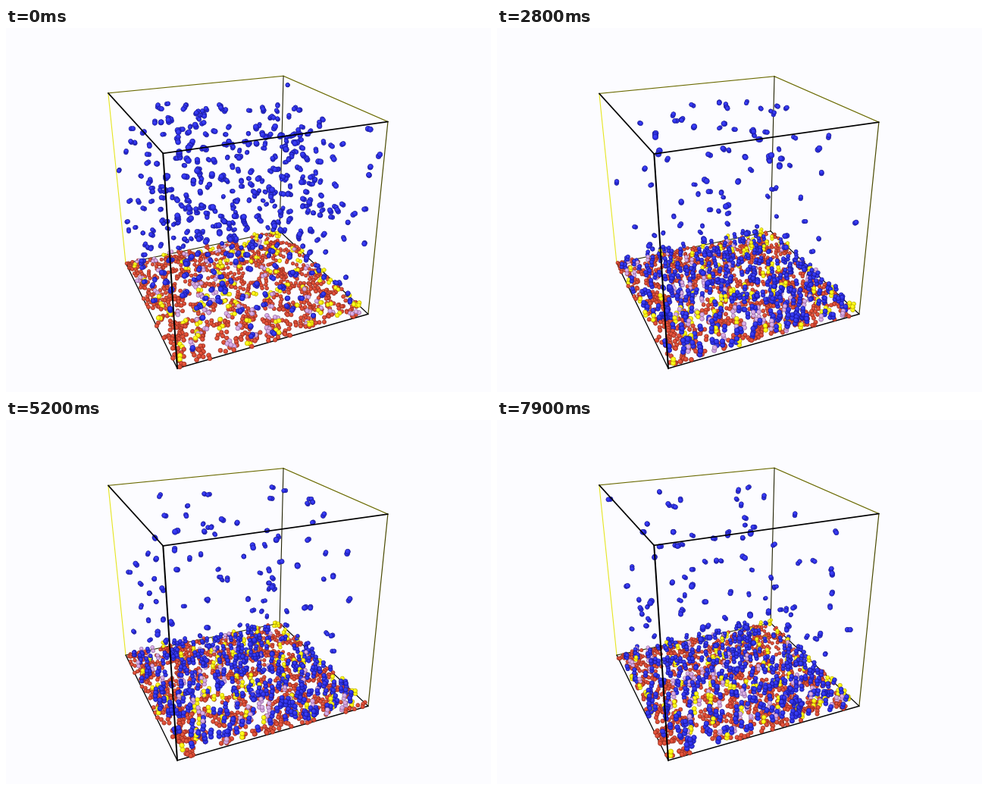
Animation, 640 px wide and 480 px high, one loop 8 s. Source, as a matplotlib script:

```python
import numpy as np
import matplotlib.pyplot as plt
from matplotlib.animation import FuncAnimation

W, H, DPI = 640, 480, 80
FRAMES, STEP = 80, 100
PT = 72 / DPI
N_RED, N_YELLOW, N_PLUM, N_GAS, N_LAND = 560, 88, 68, 106, 340

BLUE, RED, YELLOW, PLUM = range(4)
RADIUS = np.array([3.75, 3.3, 3.5, 3.5])
BODY = np.array([[40, 42, 222], [212, 68, 46], [248, 240, 0], [208, 158, 220]]) / 255
RIM = np.array([[24, 24, 140], [140, 42, 28], [176, 164, 0], [136, 98, 148]]) / 255
SHINE = np.array([[58, 62, 244], [228, 86, 62], [255, 252, 40], [220, 178, 232]]) / 255

# Corners of the box: floor then lid, starting at the front and going right.
CORNERS = [(0, 0), (1, 0), (1, 1), (0, 1)]
FLOOR = [(226, 449), (478, 377), (361, 268), (158, 310)]
LID = [(207, 165), (504, 124), (366, 63), (135, 86)]


def fit_camera():
    """Least-squares perspective matrix from the eight box corners."""
    rows, rhs = [], []
    for z, pixels in enumerate((FLOOR, LID)):
        for (x, y), (u, v) in zip(CORNERS, pixels):
            rows.append([x, y, z, 1, 0, 0, 0, 0, -u * x, -u * y, -u * z])
            rows.append([0, 0, 0, 0, x, y, z, 1, -v * x, -v * y, -v * z])
            rhs += [u, v]
    sol = np.linalg.lstsq(np.array(rows, float), np.array(rhs, float), rcond=None)[0]
    return np.append(sol, 1).reshape(3, 4)


CAMERA = fit_camera()


def project(p):
    q = np.c_[p, np.ones(len(p))] @ CAMERA.T
    return q[:, :2] / q[:, 2:], q[:, 2]


def box_height(k):
    return np.interp(k, [0, 10, 43, 56, 61, 65, 79],
                     [1, 1, 0.996, 0.999, 0.985, 0.998, 1])


def fold(a):
    """Reflect positions at the walls 0 and 1."""
    return 1 - np.abs(a % 2 - 1)


rng = np.random.default_rng(12)
turn = rng.uniform(0, 2 * np.pi, 7)
WAVES = np.c_[np.cos(turn), np.sin(turn)]
WAVE_NUM = rng.uniform(32, 60, 7)
WAVE_PHASE = rng.uniform(0, 6.3, 7)
WAVE_SPEED = rng.uniform(-0.3, 0.3, 7)


class Layer:
    """Sites on the floor that wander and gather into patches."""

    def __init__(self, n):
        self.base = rng.random((n, 2))
        self.phase = rng.uniform(0, 6.3, (n, 2))
        self.speed = rng.normal(0, 0.3, (n, 2))
        self.angle = rng.uniform(0, 6.3, n)
        self.spin = rng.normal(0, 0.4, n)

    def at(self, k, noise):
        p = self.base + 0.04 * np.sin(self.phase + self.speed * k)
        arg = p @ WAVES.T * WAVE_NUM + WAVE_PHASE + WAVE_SPEED * k
        p = p + 0.005 * np.sin(arg) @ WAVES
        p += noise.normal(0, 0.005, p.shape)
        return 0.005 + 0.99 * fold(p)

    def axis(self, k):
        a = self.angle + self.spin * k
        return np.c_[np.cos(a), np.sin(a)]


def unit(n):
    v = rng.normal(size=(n, 3))
    return v / np.linalg.norm(v, axis=1)[:, None]


red, yellow, plum, landed = (Layer(n) for n in (N_RED, N_YELLOW, N_PLUM, N_LAND))
gas_pos = rng.random((N_GAS, 3))
gas_vel = rng.normal(0, 0.11, (N_GAS, 3))
gas_axis, gas_side = unit(N_GAS), unit(N_GAS)
gas_spin = rng.normal(0, 0.8, N_GAS)
fall_pos = rng.random((N_LAND, 3)) * [1, 1, 0.96] + [0, 0, 0.03]
fall_axis = unit(N_LAND)
fall_time = np.clip(1 + rng.exponential(1.9, N_LAND), 1, 6.5)
rest_z = rng.uniform(0.018, 0.05, N_LAND)
stack_up = rng.uniform(0.014, 0.026, N_YELLOW + N_PLUM)


def pair(center, half):
    return np.r_[center - half, center + half]


def stack(layer, lift, k, noise):
    """Two beads that rise from lying flat to an upright column."""
    up = min(k / 5, 1) * 0.6 + 0.4
    xy = layer.at(k, noise)
    low = np.c_[xy, np.full(len(xy), 0.014)]
    lean = np.c_[layer.axis(k) * 0.02 * (1.15 - up), lift * up]
    return np.r_[low, low + lean]


def atoms(k):
    noise = np.random.default_rng(1000 + k)

    flat = np.c_[red.axis(k) * 0.0125, np.zeros(N_RED)]
    reds = pair(np.c_[red.at(k, noise), np.full(N_RED, 0.004)], flat)
    reds[:, :2] = np.clip(reds[:, :2], 0, 1)
    yellows = stack(yellow, stack_up[:N_YELLOW], k, noise)
    plums = stack(plum, stack_up[N_YELLOW:], k, noise)

    p = fold(gas_pos + gas_vel * k) * [1, 1, 0.94] + [0, 0, 0.05]
    a = (gas_spin * k)[:, None]
    gas = pair(p, 0.005 * (gas_axis * np.cos(a) + gas_side * np.sin(a)))

    s = np.minimum(k / fall_time, 1)[:, None]
    rest = np.c_[landed.at(k, noise), rest_z]
    upright = np.c_[landed.axis(k) * 0.002, np.full(N_LAND, 0.009)]
    down = pair(fall_pos + (rest - fall_pos) * s,
                0.005 * fall_axis * (1 - s) + upright * s)

    groups = [(gas, BLUE), (down, BLUE), (reds, RED), (yellows, YELLOW), (plums, PLUM)]
    pts = np.concatenate([g for g, _ in groups]) * [1, 1, box_height(k)]
    kind = np.concatenate([np.full(len(g), c) for g, c in groups])
    return pts, kind


fig = plt.figure(figsize=(W / DPI, H / DPI), dpi=DPI, facecolor="#fcfcff")
ax = fig.add_axes([0, 0, 1, 1])
ax.set_xlim(0, W)
ax.set_ylim(H, 0)
ax.axis("off")

INK, OLIVE, GOLD = "#000000", "#6a6a00", "#e6e620"
edges = []


def edge(a, b, width, color=INK, z=1):
    line, = ax.plot([], [], color=color, lw=width * PT, zorder=z,
                    solid_capstyle="round")
    edges.append((line, a, b))


# Corners 0-3 are the floor, 4-7 the lid.
edge(3, 7, 1.1, GOLD)
edge(2, 3, 1.1, "#303000")
edge(6, 7, 1.1, OLIVE)
edge(5, 6, 1.2, OLIVE)
edge(2, 6, 1.1, "#202000")
edge(1, 5, 1.2, "#4a4a00")
edge(1, 2, 1.2)
edge(0, 3, 1.3)
edge(0, 1, 1.5)
edge(0, 4, 2, z=3)
edge(4, 5, 1.7, z=3)
edge(4, 7, 1.7, z=3)

balls = ax.scatter([], [], zorder=2)


def draw(k):
    h = box_height(k)
    box = np.array([(x, y, z) for z in (0, h) for x, y in CORNERS])
    uv, _ = project(box)
    for line, a, b in edges:
        line.set_data(uv[[a, b], 0], uv[[a, b], 1])

    pts, kind = atoms(k)
    uv, depth = project(pts)
    order = np.argsort(-depth)
    uv, kind = uv[order], kind[order]
    r = RADIUS[kind] / depth[order]

    # Each ball is a rimmed disc followed by its lit spot.
    n = len(r)
    spots = np.repeat(uv, 2, axis=0)
    spots[1::2] += np.c_[-0.15 * r, -0.2 * r]
    size = np.empty(2 * n)
    size[::2] = (2 * r - 0.6) * PT
    size[1::2] = 1.1 * r * PT
    face = np.empty((2 * n, 3))
    face[::2], face[1::2] = BODY[kind], SHINE[kind]
    rim = face.copy()
    rim[::2] = RIM[kind]
    balls.set_offsets(spots)
    balls.set_sizes(size ** 2)
    balls.set_facecolor(face)
    balls.set_edgecolor(rim)
    balls.set_linewidth(np.tile([0.6 * PT, 0], n))
    return [balls]


anim = FuncAnimation(fig, draw, frames=FRAMES, interval=STEP,
                     init_func=lambda: [balls], repeat=True, repeat_delay=0)
plt.show()
```
